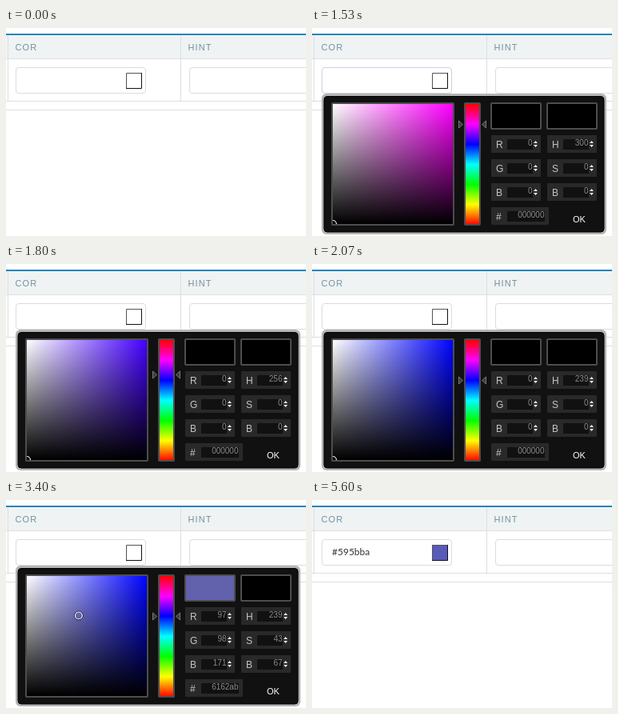
Write an HTML page that moves like this. It is 375 px wide and 260 px high and loops after 6540 ms.

```html
<!DOCTYPE html>
<html lang="pt">
<head>
<meta charset="utf-8">
<title>Color picker</title>
<style>
html, body { margin: 0; width: 100%; height: 100%; overflow: hidden; background: #fff; }
svg { display: block; }
text { font: 10px "Liberation Sans", Arial, sans-serif; }
.head { font-size: 11px; letter-spacing: 1.1px; fill: #7290a3; }
.label { font-size: 12px; fill: #c4c4c4; }
.value { fill: #8b8b8b; text-anchor: end; }
.frame { fill: none; stroke: #4d4d4d; stroke-width: 2; }
.input { fill: #fff; stroke: #dcdcdc; }
.arrow { fill: #3a3a3a; stroke: #777; }
</style>
</head>
<body>
<svg width="375" height="260" viewBox="0 0 375 260">
  <defs>
    <linearGradient id="white">
      <stop stop-color="#fff"/><stop offset="1" stop-color="#fff" stop-opacity="0"/>
    </linearGradient>
    <linearGradient id="black" x2="0" y2="1">
      <stop stop-color="#000" stop-opacity="0"/><stop offset="1"/>
    </linearGradient>
    <linearGradient id="rainbow" x2="0" y2="1"></linearGradient>
    <clipPath id="square"><rect x="26" y="95" width="150" height="150"/></clipPath>
  </defs>

  <rect y="7" width="375" height="2" fill="#2585c0"/>
  <rect y="9" width="375" height="29" fill="#eff3f3"/>
  <path d="M0 38.5H375M0 91.5H375M0 102.5H375M2.5 9V91M218.5 9V91" stroke="#dcdfdf"/>
  <text class="head" x="11.5" y="28">COR</text>
  <text class="head" x="227.5" y="28">HINT</text>
  <rect class="input" id="field" x="12.5" y="49.5" width="162" height="32" rx="3.5"/>
  <rect class="input" x="229.5" y="49.5" width="162" height="32" rx="3.5"/>
  <rect id="caret" x="25" y="58" width="1" height="15" fill="#222"/>
  <text id="typed" x="25" y="69" style="font: 12px Lato, sans-serif" fill="#333"></text>
  <rect id="chip" x="150" y="56" width="20" height="20"/>
  <path d="M150.5 76V56.5H170" fill="none" stroke="#555"/>
  <path d="M150 75.5H169.5V56" fill="none" stroke="#111"/>

  <g id="picker">
    <rect x="12" y="82" width="356" height="176" rx="6" fill="#b4b4b4"/>
    <rect x="15" y="85.5" width="350" height="169.5" rx="4" fill="#111" stroke="#000"/>
    <rect id="tint" x="26" y="95" width="150" height="150"/>
    <rect x="26" y="95" width="150" height="150" fill="url(#white)"/>
    <rect x="26" y="95" width="150" height="150" fill="url(#black)"/>
    <g clip-path="url(#square)">
      <g id="ring" fill="none">
        <circle r="5.3" stroke="#000"/><circle r="4.5" stroke="#fff" stroke-width="1.2"/>
      </g>
    </g>
    <rect class="frame" x="25" y="94" width="152" height="152" rx="1"/>
    <rect x="192" y="95" width="18" height="151" fill="url(#rainbow)"/>
    <rect class="frame" x="191" y="94" width="19" height="152" rx="1"/>
    <g id="marker" class="arrow">
      <path d="M183.5 -4.5L188.5 0L183.5 4.5Z"/><path d="M217.5 -4.5L212.5 0L217.5 4.5Z"/>
    </g>
    <rect class="frame" id="fresh" x="224" y="94" width="62" height="32" rx="1"/>
    <rect class="frame" x="294" y="94" width="62" height="32" rx="1" style="fill:#000"/>
    <g id="fields"></g>
    <text x="326" y="243" style="font-size:11px" fill="#fff">OK</text>
  </g>
</svg>
<script>
const LOOP = 6540, OPEN = 600, CLOSE = 5600;
// [time, hue] and [time, saturation, brightness]
const hues = [[0, 300], [1600, 292], [1670, 280], [1730, 268], [1800, 256],
  [1870, 249], [1930, 244], [2000, 242], [2070, 239]];
const shades = [[0, 0, 0], [3000, 37, 64], [3130, 38, 65], [3270, 40, 66], [3330, 42, 66],
  [3400, 43.2, 67], [3530, 45, 68], [3670, 46, 69], [3930, 47, 70], [4070, 50, 72], [4130, 52, 73]];

const $ = id => document.getElementById(id);
const set = (id, name, value) => $(id).setAttribute(name, value);
const show = (id, on) => set(id, "visibility", on ? "visible" : "hidden");
const at = (steps, t) => steps.filter(s => s[0] <= t).pop();

$("rainbow").innerHTML = [0, 1, 2, 3, 4, 5, 6].map(i =>
  `<stop offset="${i / 6}" stop-color="hsl(${360 - i * 60},100%,50%)"/>`).join("");

function addField(name, x, y, width) {
  const hex = name === "#", right = x + width - (hex ? 6 : 11);
  const spin = hex ? "" :
    `<path d="M${x + 53} ${y + 10}h5l-2.5 -3zM${x + 53} ${y + 12}h5l-2.5 3z" fill="#eee"/>`;
  $("fields").innerHTML += `<rect x="${x}" y="${y}" width="${width}" height="22" rx="1" fill="#292929"/>
    <rect x="${x + 20}" y="${y + 5}" width="${right - x - 19}" height="13" fill="#111"/>
    <text class="label" x="${x + 6}" y="${y + 16}">${name}</text>
    <text class="value" id="val${name}" x="${right + .5}" y="${y + 13}"></text>${spin}`;
}
["R", "G", "B"].forEach((name, i) => addField(name, 224, 134 + i * 30, 62));
["H", "S", "B "].forEach((name, i) => addField(name, 294, 134 + i * 30, 62));
addField("#", 224, 224, 72);

function toRgb(h, s, v) {
  return [5, 3, 1].map(n => {
    const k = (n + h / 60) % 6;
    return Math.round(2.55 * v * (1 - s / 100 * Math.max(0, Math.min(k, 4 - k, 1))));
  });
}

function draw(t) {
  const h = at(hues, t)[1], [, s, v] = at(shades, t);
  const rgb = toRgb(h, s, v);
  const hex = rgb.map(c => c.toString(16).padStart(2, "0")).join("");
  const done = t >= CLOSE;

  show("picker", t >= OPEN && !done);
  show("caret", t >= OPEN && t < 1130);
  const fading = t < 670 || t >= 1530;
  $("field").style.stroke = t < OPEN || t >= 1600 ? "#dcdcdc" : fading ? "#cfcfe0" : "#b9b9dc";
  $("typed").textContent = done ? "#" + hex : "";
  set("chip", "fill", done ? "#" + hex : "#fff");

  set("tint", "fill", `hsl(${h},100%,50%)`);
  set("ring", "transform", `translate(${26 + 1.5 * s} ${245 - 1.5 * v})`);
  set("marker", "transform", `translate(0 ${95.5 + Math.floor(150 - h / 2.4)})`);
  $("fresh").style.fill = "#" + hex;
  const values = { R: rgb[0], G: rgb[1], B: rgb[2], H: h, S: Math.round(s), "B ": v, "#": hex };
  for (const name in values) $("val" + name).textContent = values[name];
}

const start = performance.now();
(function tick() {
  draw((performance.now() - start) % LOOP);
  requestAnimationFrame(tick);
})();
</script>
</body>
</html>
```
